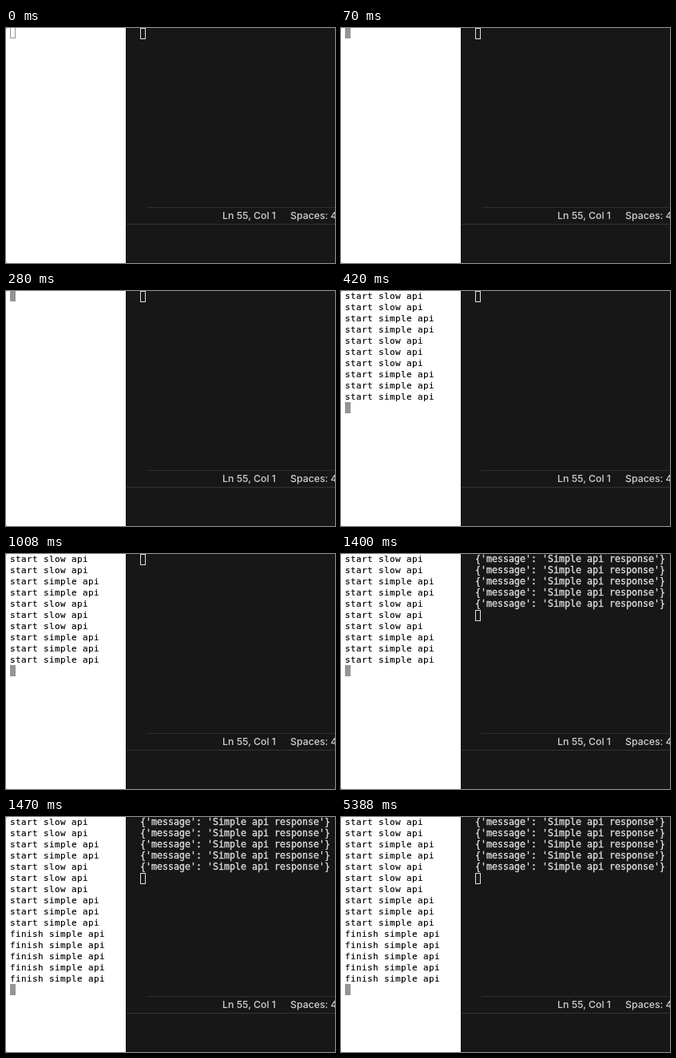
Write an HTML page that moves like this. It is 412 px wide and 294 px high and loops after 8000 ms.

```html
<!DOCTYPE html>
<html lang="en">
<head>
<meta charset="utf-8">
<title>Two terminals</title>
<style>
  html, body { margin: 0; width: 100%; height: 100%; overflow: hidden; background: #fff; }
  svg { display: block; width: 412px; height: 294px; }
  .mono { font-family: "DejaVu Sans Mono", monospace; white-space: pre; }
  #server { font-size: 11px; letter-spacing: .378px; fill: #000; stroke: #000; stroke-width: .15px; }
  #client { font-size: 11.63px; fill: #dcdcdc; stroke: #dcdcdc; stroke-width: .35px; }
  .status { font: 500 12.3px Inter, sans-serif; fill: #d0d0d0; }
</style>
</head>
<body>
<svg viewBox="0 0 412 294">
  <rect width="412" height="294" fill="#fff"/>
  <path d="M0 0h1v1h-1zM0 293h1v1h-1z" fill="#999"/>
  <rect x="150" width="262" height="294" fill="#171717"/>
  <path d="M150.5 0V294" stroke="#0e0e0e"/>
  <path d="M176 224.5H412" stroke="#2e2e2e"/>
  <path d="M151 245.5H412" stroke="#333"/>
  <text class="status" x="271" y="239">Ln 55, Col 1</text>
  <text class="status" x="356" y="239">Spaces: 4</text>
  <g id="server" class="mono"></g>
  <g id="client" class="mono"></g>
  <rect id="serverCursor"/>
  <rect id="clientCursor" x="168.5" width="6" height="13" fill="none" stroke="#e0e0e0"/>
</svg>
<script>
const LOOP = 8000, ROW = 14;
const FOCUS = 70, START = 420, RESPOND = 1400, FINISH = 1470;
const byId = id => document.getElementById(id);

const starts = [..."wwiiwwwiii"].map(c => `start ${c === "w" ? "slow" : "simple"} api`);
const finishes = Array(5).fill("finish simple api");
const replies = Array(5).fill("{'message': 'Simple api response'}");

function addLines(group, lines, x) {
  return lines.map((line, row) => {
    const text = document.createElementNS("http://www.w3.org/2000/svg", "text");
    text.setAttribute("x", x);
    text.setAttribute("y", 10 + row * ROW);
    text.textContent = line;
    return group.appendChild(text);
  });
}

const serverLines = addLines(byId("server"), [...starts, ...finishes], 5);
const clientLines = addLines(byId("client"), replies, 168);

function setAttrs(el, attrs) {
  for (const key in attrs) el.setAttribute(key, attrs[key]);
}

function showLines(lines, count) {
  lines.forEach((line, i) => line.setAttribute("visibility", i < count ? "visible" : "hidden"));
}

function render(t) {
  const printed = t < START ? 0 : t < FINISH ? starts.length : serverLines.length;
  const replied = t < RESPOND ? 0 : clientLines.length;
  showLines(serverLines, printed);
  showLines(clientLines, replied);

  const top = printed * ROW - 1;
  setAttrs(byId("serverCursor"), t < FOCUS
    ? { x: 5.5, y: top + .5, width: 6, height: 13, fill: "none", stroke: "#929292" }
    : { x: 5, y: top, width: 7, height: 14, fill: "#949494", stroke: "none" });
  byId("clientCursor").setAttribute("y", replied * ROW + .5);
}

const begin = performance.now();
function tick() {
  render((performance.now() - begin) % LOOP);
  requestAnimationFrame(tick);
}
tick();
</script>
</body>
</html>
```
